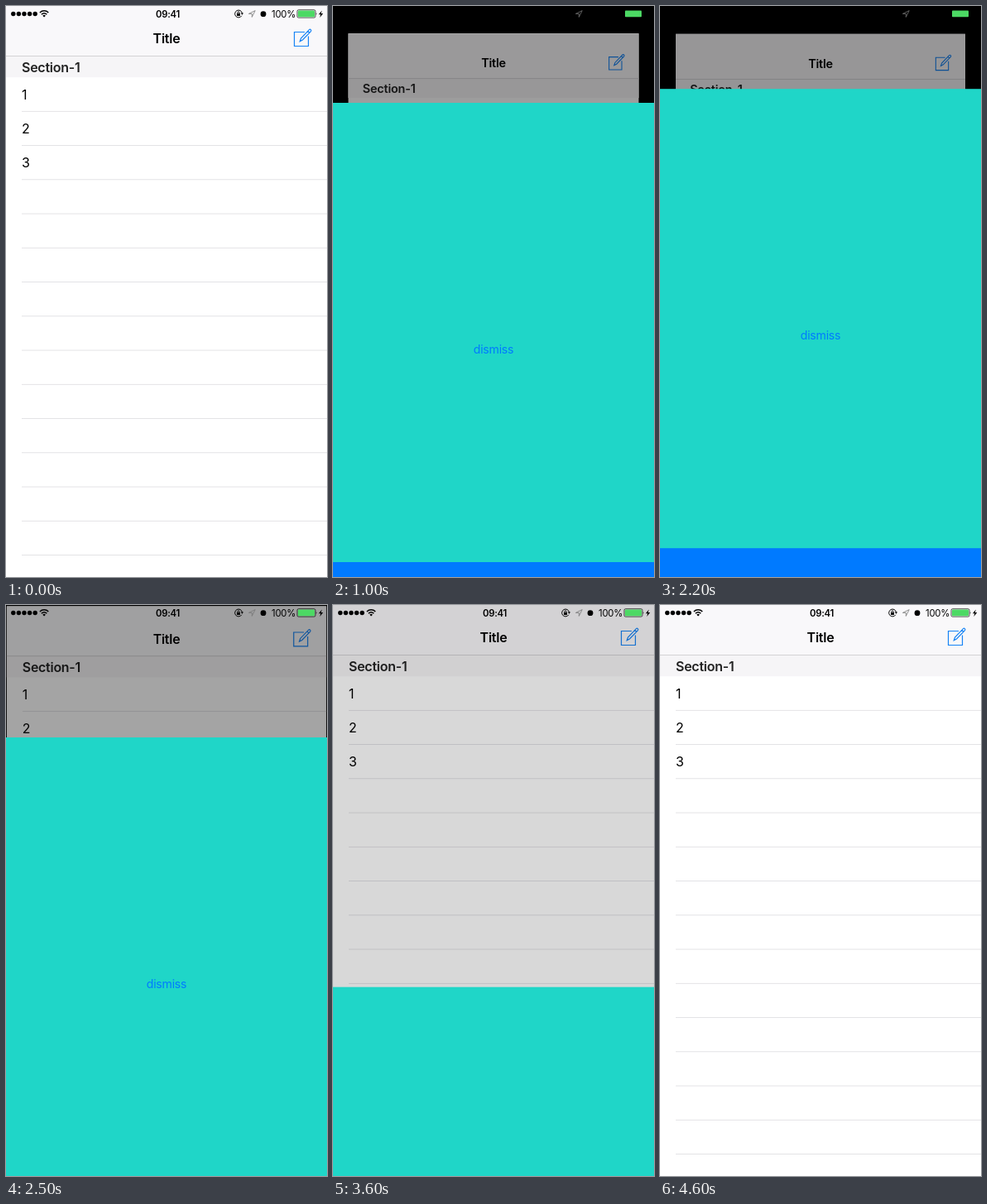
Recreate the animation shown at these times as an HTML page. Size 388 by 690 pixels, loop 4.7 s.

```html
<!DOCTYPE html>
<html lang="en">
<head>
<meta charset="utf-8">
<title>Modal sheet</title>
<style>
  html, body { margin: 0; width: 100%; height: 100%; overflow: hidden; background: #000; }
  svg { display: block; width: 388px; height: 690px; font: 16px Inter, Roboto, sans-serif; letter-spacing: -.25px; }
  .bold { font-weight: 600; }
  .small { font-size: 11.3px; letter-spacing: -.2px; }
  .mid { text-anchor: middle; }
  .line { fill: none; stroke: #000; }
</style>
</head>
<body>
<svg viewBox="0 0 388 690">
  <g id="page">
    <rect width="388" height="690" fill="#fff"/>
    <rect width="388" height="60" fill="#f9f8fa"/>
    <rect y="60" width="388" height="26.2" fill="#f6f5f7"/>
    <rect y="60" width="388" height=".8" fill="#cccbce"/>
    <text class="bold mid" x="194" y="45.2">Title</text>
    <text class="bold" x="19" y="79.6" fill="#222">Section-1</text>
    <g id="rows"></g>
    <g id="compose" fill="none" stroke="#1583f5" stroke-width="1.2">
      <path d="M361 31.5H348.5V48.5H365.5V36.5"/>
      <path d="M355.3 42.7l1.2-3.7 10-10.4q1-.8 1.9 0t.1 2l-10 10.4zM364.8 30.4l2 2"/>
    </g>
    <rect id="dim" width="388" height="690"/>
  </g>
  <g id="status">
    <g id="dots"></g>
    <g class="line" stroke-width="1.5">
      <path d="M40.9 8a7.3 7.3 0 0 1 10.4 0M42.9 10.2a4.5 4.5 0 0 1 6.4 0"/>
    </g>
    <path d="M46.1 13.6l-1.8-1.9a2.6 2.6 0 0 1 3.6 0z"/>
    <text class="bold small mid" x="195.5" y="14">09:41</text>
    <path class="line" d="M284.8 11.8a4.4 4.4 0 1 1 .6-3.2"/>
    <path d="M283.7 8.5h3.4l-1.7 2.3zM279 9h4v3h-4z"/>
    <path class="line" stroke-width=".9" d="M279.9 9.2V8a1.1 1.1 0 0 1 2.2 0v1.2"/>
    <path class="line" stroke-width=".8" style="stroke:#777" d="M301.2 5.6L293.4 9.4H297.3V13.4z"/>
    <circle cx="311" cy="9.7" r="3.4"/>
    <text class="small" x="321" y="14">100%</text>
    <rect class="line" x="352" y="4.7" width="22" height="9.4" rx="1.6" stroke-width=".7"/>
    <rect x="353" y="5.6" width="20" height="7.6" rx=".8" fill="#4cd964"/>
    <path d="M374.8 7.7q1.4 1.7 0 3.4zM381.8 5.4l-3.9 4.8h2.4l-1 3.8 4-5h-2.5z"/>
  </g>
  <g id="sheet">
    <rect width="388" height="556" fill="#1fd6c8"/>
    <rect y="555" width="388" height="160" fill="#007aff"/>
    <text class="mid" x="194" y="303" font-size="14.1" fill="#007aff">dismiss</text>
  </g>
</svg>
<script>
const LOOP = 4700, STEP = 100, TOP = 94, TRAVEL = 596, PULL = 66;
const $ = id => document.getElementById(id);
const clamp = x => Math.min(1, Math.max(0, x));
const smooth = x => (x = clamp(x), x * x * (3 - 2 * x));

// list rows and signal dots
for (let i = 0; i < 14; i++) {
  const y = 86.2 + 41.25 * i;
  $('rows').innerHTML += `<rect x="19" y="${y + 40.7}" width="369" height=".8" fill="#dddce0"/>` +
    (i < 3 ? `<text x="19" y="${y + 26.4}">${i + 1}</text>` : '');
}
for (let i = 0; i < 5; i++)
  $('dots').innerHTML += `<circle cx="${8.8 + 6.6 * i}" cy="9.5" r="2.7"/>`;

// critically damped spring
const spring = s => s > 0 ? 1 - (1 + 18.25 * s) * Math.exp(-18.25 * s) : 0;

// distance of the sheet below its open place
function offset(t) {
  if (t < 1400) return TRAVEL * (1 - spring((t - 723) / 1000));
  if (t < 2500) return PULL * smooth((t - 2130) / 370);
  if (t < 3000) return PULL * (1 - smooth((t - 2500) / 200));
  const u = clamp((t - 3372) / 500) ** 1.65;
  return TRAVEL * (1 - (1 - u) ** 3);
}

function draw(t) {
  const d = offset(t), closed = d / TRAVEL;
  // on the way out the page grows back within the first part of the pull
  const grown = t < 1400 ? closed : smooth(d / 76);
  const scale = .9 + .1 * grown;
  $('page').setAttribute('transform', `translate(194 345) scale(${scale}) translate(-194 -345)`);
  $('dim').setAttribute('opacity', .4 * (1 - closed));
  $('sheet').setAttribute('transform', `translate(0 ${TOP + d})`);
  $('compose').setAttribute('opacity', t < 600 ? 1 : clamp(.25 + Math.max(0, t - 700) / 330));
}

function tick(now) {
  draw(Math.floor(now % LOOP / STEP) * STEP);
  requestAnimationFrame(tick);
}
draw(0);
requestAnimationFrame(tick);
</script>
</body>
</html>
```
